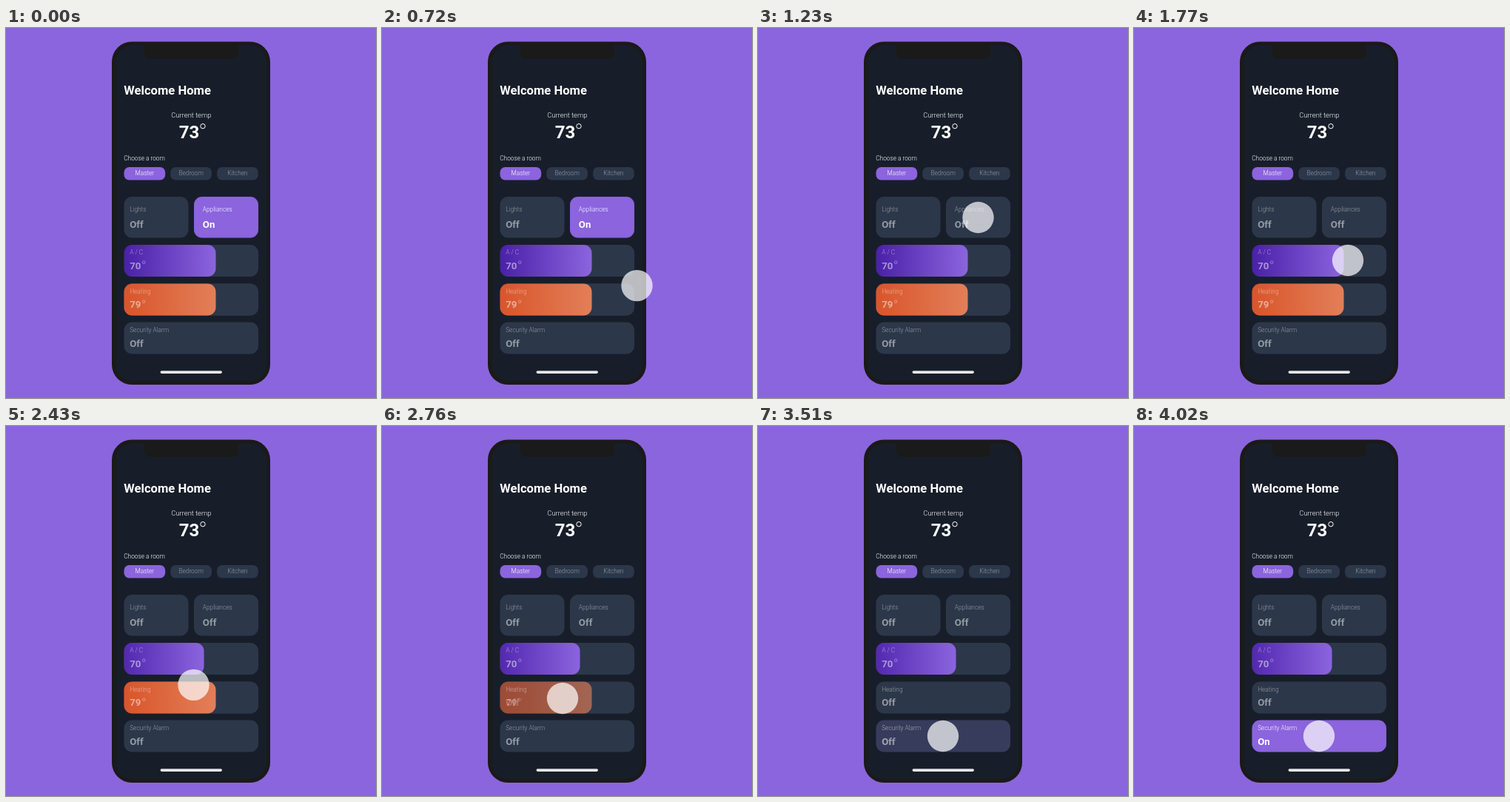
Write an HTML page that moves like this. It is 500 px wide and 500 px high and loops after 4050 ms.

```html
<!DOCTYPE html>
<html lang="en">
<head>
<meta charset="utf-8">
<title>Smart home controls</title>
<style>
html, body { margin: 0; width: 100%; height: 100%; overflow: hidden; background: #8b65de; }
svg { display: block; width: 100vw; height: 100vh; }
text { font-family: Roboto, "Open Sans", sans-serif; font-weight: 300; font-size: 8.3px; fill: #fff; }
.bold { font-weight: 700; font-size: 13.2px; }
.mid { text-anchor: middle; }
.dim { fill-opacity: .5; }
.ring { fill: none; stroke: #fff; }
</style>
</head>
<body>
<svg viewBox="0 0 500 500">
  <defs>
    <linearGradient id="cool"><stop stop-color="#4a20a8"/><stop offset="1" stop-color="#8b64de"/></linearGradient>
    <linearGradient id="warm"><stop stop-color="#d9552a"/><stop offset="1" stop-color="#e27f58"/></linearGradient>
    <clipPath id="bar"><rect x="159.5" y="293" width="181.5" height="43" rx="11"/></clipPath>
  </defs>
  <rect x="143" y="18.5" width="214" height="463.5" rx="27" fill="#1a1a1a"/>
  <rect x="148.5" y="24" width="203" height="452.5" rx="21" fill="#181e29"/>
  <path d="M187 23V33Q187 42 196 42H305Q314 42 314 33V23Z" fill="#1a1a1a"/>
  <rect x="208.5" y="463.3" width="83.5" height="3.6" rx="1.8" fill="#e6e6e6"/>

  <text class="bold" x="159.3" y="90" style="font-size:16.6px">Welcome Home</text>
  <text class="mid" x="250.4" y="120.7" style="font-size:9.4px">Current temp</text>
  <text class="bold" x="233.7" y="149" style="font-size:24px">73</text>
  <circle class="ring" cx="266" cy="132.7" r="3.2"/>
  <text x="159.2" y="178.6">Choose a room</text>
  <g id="ui"></g>
  <circle id="touch" r="21.2" fill="#fff" fill-opacity=".7"/>
</svg>
<script>
const LOOP = 4050, PURPLE = '#8b64de', SLATE = '#2c374a';
const ui = document.getElementById('ui'), touch = document.getElementById('touch');

function add(tag, attrs, text = '', parent = ui) {
  const el = document.createElementNS('http://www.w3.org/2000/svg', tag);
  for (const k in attrs) el.setAttribute(k, attrs[k]);
  el.textContent = text;
  return parent.appendChild(el);
}
const box = (x, y, width, height, rx, fill, parent) =>
  add('rect', { x, y, width, height, rx, fill }, '', parent);

// A label with a value below it
function caption(x, y, gap, name, value, cls, parent) {
  add('text', { x, y, class: cls }, name, parent);
  add('text', { x, y: y + gap, class: 'bold ' + cls }, value, parent);
  if (/\d/.test(value))
    add('circle', { class: 'ring', cx: x + 19, cy: y + 10.7, r: 1.8, 'stroke-width': .7, 'stroke-opacity': .5 }, '', parent);
}

// A card whose "on" face lies over its "off" face
function card(x, y, w, h, tx, ty, gap, name) {
  const off = add('g', {}), on = add('g', {});
  box(x, y, w, h, 11, SLATE, off);
  caption(tx, ty, gap, name, 'Off', 'dim', off);
  box(x, y, w, h, 11, PURPLE, on);
  caption(tx, ty, gap, name, 'On', '', on);
  return on;
}

['Master', 'Bedroom', 'Kitchen'].forEach((name, i) => {
  const x = 159.5 + i * 62.8;
  box(x, 188, 55.7, 17.5, 7, i ? SLATE : PURPLE);
  add('text', { x: x + 27.8, y: 198.8, class: i ? 'mid dim' : 'mid' }, name);
});

card(159.5, 228, 87, 55.5, 167.2, 248, 21.5, 'Lights').setAttribute('opacity', 0);
const appliances = card(254, 228, 87, 55.5, 265.8, 248, 21.5, 'Appliances');

box(159.5, 293, 181.5, 43, 11, SLATE);
const fill = box(159.5, 293, 124, 43, 11, 'url(#cool)', add('g', { 'clip-path': 'url(#bar)' }));
caption(167.2, 306, 19.5, 'A / C', '70', 'dim');

box(159.5, 345.5, 181.5, 43, 11, SLATE);
caption(167.2, 359, 19.3, 'Heating', 'Off', 'dim');
const heating = add('g', {});
box(159.5, 345.5, 181.5, 43, 11, SLATE, heating);
box(159.5, 345.5, 124, 43, 11, 'url(#warm)', heating);
caption(167.2, 359, 19.3, 'Heating', '79', 'dim', heating);

const alarm = card(159.5, 397.5, 181.5, 43, 167.2, 411.3, 19.2, 'Security Alarm');

const ramp = (t, start, length) => Math.min(1, Math.max(0, (t - start) / length));
const ease = p => p < .5 ? 4 * p ** 3 : 1 - 4 * (1 - p) ** 3;

// start, length, from, control, to
const moves = [
  [420, 600, [421, 387], [331, 376], [297.5, 256]],
  [1270, 450, [297.5, 256], [293, 285], [289, 314]],
  [1810, 300, [289, 314], [281, 314], [273, 314]],
  [2150, 500, [273, 314], [258, 341], [244, 368]],
  [2860, 500, [244, 368], [247, 393], [250, 419]]
];

function touchAt(t) {
  const [start, length, a, b, c] = moves.findLast(m => t >= m[0]) || moves[0];
  const p = ease(ramp(t, start, length)), q = 1 - p;
  return [0, 1].map(i => q * q * a[i] + 2 * p * q * b[i] + p * p * c[i]);
}

function draw(t) {
  const [x, y] = touchAt(t);
  touch.setAttribute('cx', x);
  touch.setAttribute('cy', y);
  touch.setAttribute('opacity', ramp(t, 340, 150));
  appliances.setAttribute('opacity', 1 - ramp(t, 1110, 90));
  fill.setAttribute('x', 159.5 - 16 * ease(ramp(t, 1810, 300)));
  heating.setAttribute('opacity', 1 - ramp(t, 2730, 90));
  alarm.setAttribute('opacity', ramp(t, 3500, 90));
}

const origin = performance.now();
function frame() {
  draw((performance.now() - origin) % LOOP);
  requestAnimationFrame(frame);
}
frame();
</script>
</body>
</html>
```
